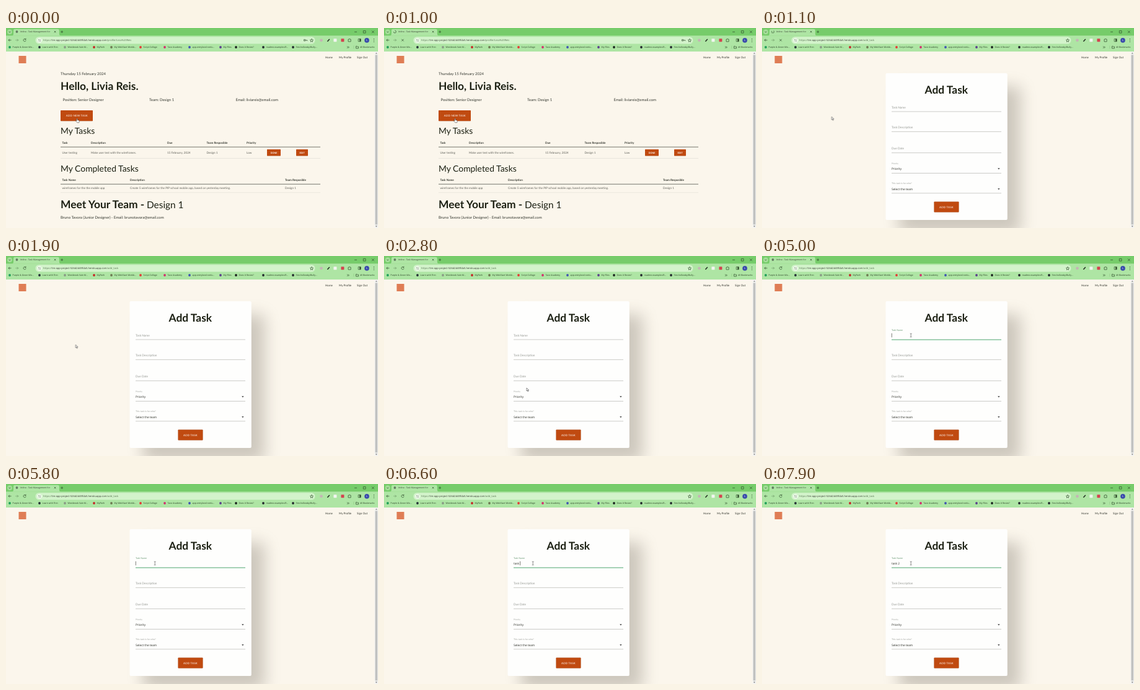
An HTML page for the animation above (8000 ms loop, 600 px wide and 323 px high).

```html
<!DOCTYPE html>
<html lang="en">
<head>
<meta charset="utf-8">
<title>Task manager demo</title>
<style>
html, body { margin: 0; width: 100%; height: 100%; overflow: hidden; background: #fbf6ec; }
svg { display: block; width: 100vw; height: 100vh; text-rendering: geometricPrecision; }
text { font: 6px Lato, sans-serif; fill: #34372f; white-space: pre; }
.ui text, .input { font-family: "Open Sans", "Noto Sans", sans-serif; }
.tab { font-size: 3.5px; }
.url { font-size: 4.1px; }
.mark text { font-size: 3.5px; fill: #22351f; }
.dim { fill: #55704f; }
.icon { fill: none; stroke: #2d4a29; stroke-width: .7; }
.nav text { font-size: 4.5px; }
.h1 { font-size: 17.4px; font-weight: 700; fill: #1c2013; }
.h2 { font-size: 13.9px; fill: #1c2013; }
.cell { font-size: 4.65px; fill: #5c5d56; }
.head { font-size: 4.6px; font-weight: 700; }
.btn rect { fill: #c04a10; filter: drop-shadow(0 .5px .5px #0004); }
.btn text { font-size: 4.4px; letter-spacing: .2px; fill: #fff; text-anchor: middle; }
.btn .small { font-size: 3.7px; letter-spacing: 0; font-weight: 700; }
.field { font-size: 4.75px; fill: #92958f; }
.tiny { font-size: 3.7px; fill: #a2a49f; }
.input { font-size: 4.75px; fill: #25271f; }
.rule { stroke: #a9aaa5; stroke-width: .6; }

/* One shared 8 s clock */
.profile, .form, .busy, .idle, .spin, .still, .hand, .arrow, .beam {
  animation: 8s step-end infinite;
}
.profile, .hand { animation-name: untilNav; }
.form { animation-name: afterNav; }
.busy { animation-name: loading; }
.idle { animation-name: notLoading; }
.spin { animation-name: spinning; }
.still { animation-name: notSpinning; }
.arrow { animation-name: arrowOn; }
.beam { animation-name: beamOn; }
.pointer { animation: travel 8s infinite; }
.label { animation: floatUp 8s infinite; }
.focus { animation: underline 8s infinite; stroke: #48b574; stroke-width: .8; }
.ring { animation: turn 1s linear infinite; transform-origin: 17.5px 6px; }

@keyframes untilNav { 0% { visibility: visible } 13.7%, 100% { visibility: hidden } }
@keyframes afterNav { 0% { visibility: hidden } 13.7%, 100% { visibility: visible } }
@keyframes loading { 0% { visibility: hidden } 7.5% { visibility: visible } 23.7%, 100% { visibility: hidden } }
@keyframes notLoading { 0% { visibility: visible } 7.5% { visibility: hidden } 23.7%, 100% { visibility: visible } }
@keyframes spinning { 0% { visibility: hidden } 12.5% { visibility: visible } 23.7%, 100% { visibility: hidden } }
@keyframes notSpinning { 0% { visibility: visible } 12.5% { visibility: hidden } 23.7%, 100% { visibility: visible } }
@keyframes arrowOn { 0% { visibility: hidden } 13.7% { visibility: visible } 43.75%, 100% { visibility: hidden } }
@keyframes beamOn { 0% { visibility: hidden } 43.75%, 100% { visibility: visible } }
@keyframes travel {
  0%, 12.5% { transform: translate(114px, 146px); }
  13.7%, 25% { transform: translate(112.3px, 143.3px); animation-timing-function: ease-in-out; }
  34%, 36% { transform: translate(230px, 213px); animation-timing-function: ease-in-out; }
  46%, 52% { transform: translate(241px, 128px); }
  58%, 100% { transform: translate(240.2px, 128px); }
}
@keyframes floatUp {
  0%, 47.5% { transform: translate(209px, 129.6px); fill: #92958f; animation-timing-function: ease-out; }
  50%, 100% { transform: translate(209px, 120.6px) scale(.8); fill: #6b9a75; }
}
@keyframes underline { 0%, 47.5% { opacity: 0 } 50%, 100% { opacity: 1 } }
@keyframes turn { to { transform: rotate(360deg) } }
</style>
</head>
<body>
<svg viewBox="0 0 600 323" preserveAspectRatio="none">
  <defs>
    <filter id="soft" x="-30%" y="-30%" width="170%" height="170%"><feGaussianBlur stdDeviation="13"/></filter>
  </defs>
  <rect width="600" height="323" fill="#fbf6ec"/>

  <g class="profile">
    <text x="88" y="76">Thursday 15 February 2024</text>
    <text x="88" y="100.3" class="h1">Hello, Livia Reis.</text>
    <text x="91.5" y="118">Position: Senior Designer</text>
    <text x="231" y="118">Team: Design 1</text>
    <text x="370.5" y="118">Email: liviareis@email.com</text>
    <g class="btn">
      <rect x="88" y="133" width="52" height="17.2" rx=".8"/>
      <text x="114.4" y="143.3">ADD NEW TASK</text>
    </g>
    <text x="88" y="171.3" class="h2">My Tasks</text>
    <g id="tables"></g>
    <path d="M88 192.2H507M88 252.2H507" stroke="#3b3d35" stroke-width=".7"/>
    <path d="M88 210.5H507M88 265.8H507" stroke="#dedbd2" stroke-width=".6"/>
    <g class="btn">
      <rect x="421" y="196" width="22" height="10.4" rx=".6"/>
      <text x="432" y="202.6" class="small">DONE</text>
      <rect x="468" y="196" width="19" height="10.4" rx=".6"/>
      <text x="477.5" y="202.6" class="small">EDIT</text>
    </g>
    <text x="88" y="231.8" class="h2">My Completed Tasks</text>
    <text x="88" y="291.3" class="h1">Meet Your Team -</text>
    <text x="227" y="291.3" class="h2" style="font-size:15.4px">Design 1</text>
    <text x="88" y="308">Bruno Tavora (Junior Designer) - Email: brunotavora@email.com</text>
  </g>

  <g class="form">
    <rect x="221" y="95" width="196" height="237" fill="#6b6459" opacity=".32" filter="url(#soft)"/>
    <rect x="199.5" y="73" width="196.3" height="237" rx="2" fill="#fefefd"/>
    <text x="297.3" y="106.3" class="h1" text-anchor="middle">Add Task</text>
    <path class="rule" d="M209 135H386M209 167.4H386M209 201.6H386M209 234.5H386M209 266.8H386"/>
    <path class="focus" d="M209 135.3H386"/>
    <text class="field label">Task Name</text>
    <text x="209" y="162.3" class="field">Task Description</text>
    <text x="209" y="196.4" class="field">Due Date</text>
    <text x="209" y="219.5" class="tiny" style="font-size:3.4px">Priority</text>
    <text x="209" y="229" class="input">Priority</text>
    <text x="209" y="252.3" class="tiny">This task is for who?</text>
    <text x="209" y="261.7" class="input">Select the team</text>
    <path d="M380.2 226.5h3.4l-1.7 1.8zM380.2 259.2h3.4l-1.7 1.8z" fill="#151515"/>
    <text id="typed" x="209" y="129.8" class="input"></text>
    <path id="caret" d="M0 124.8V131.4" stroke="#22251d" stroke-width=".6"/>
    <g class="btn">
      <rect x="277.5" y="280.5" width="40" height="17" rx=".8"/>
      <text x="297.5" y="290.7">ADD TASK</text>
    </g>
  </g>

  <rect x="20.5" y="45" width="12" height="12" fill="#df7d55"/>
  <g class="nav">
    <text x="515" y="48.6">Home</text>
    <text x="537" y="48.6">My Profile</text>
    <text x="566" y="48.6">Sign Out</text>
  </g>

  <rect x="594.5" y="38" width="5.5" height="285" fill="#f3f3f1"/>
  <rect x="595.5" y="43.5" width="3.6" height="274" fill="#c0c1c0"/>
  <path d="M595.8 41.6h3l-1.5-1.9zM595.8 319.6h3l-1.5 1.9z" fill="#777"/>

  <g class="ui">
    <rect width="600" height="14" fill="#76cc6a"/>
    <rect y="12.3" width="600" height="25.7" fill="#aee5a4"/>
    <path d="M9 12.4q3 0 3-3V4.2q0-2.4 2.4-2.4H83.5q2.4 0 2.4 2.4V9.4q0 3 3 3z" fill="#aee5a4"/>
    <circle cx="6" cy="6.3" r="4" fill="#a3dd98"/>
    <path class="icon" d="M4.6 5.7l1.4 1.4 1.4-1.4M77.8 4.8l2.6 2.6m0-2.6l-2.6 2.6M88.2 6.2h4m-2-2v4M549.5 6.3h4M562.3 4.4h3.7v3.7h-3.7zM590 4.4l3.8 3.8m0-3.8l-3.8 3.8" style="display:none"/>
    <path class="icon" d="M4.6 5.7l1.4 1.4 1.4-1.4M77.8 4.8l2.6 2.6m0-2.6l-2.6 2.6M88.2 6.2h4m-2-2v4M562 6.3h4M576.3 4.4h3.7v3.7h-3.7zM590 4.4l3.8 3.8m0-3.8l-3.8 3.8"/>
    <circle class="still" cx="17.5" cy="6" r="1.9" fill="#637b60"/>
    <g class="spin"><path class="icon ring" d="M17.5 4a2 2 0 1 1-2 2"/></g>
    <text x="22.8" y="7.4" class="tab">Velino - Task Management for</text>

    <path class="icon" d="M14.5 19.6H10m2-2l-2 2 2 2" transform="translate(-6 0)"/>
    <path class="icon" d="M15.3 19.6h4.5m-2-2l2 2-2 2" opacity=".45"/>
    <path class="icon idle" d="M31.7 18.2a2.1 2.1 0 1 0 .5 1.6M32 16.8v1.7h-1.8"/>
    <path class="icon busy" d="M28.3 17.9l3.5 3.5m0-3.5l-3.5 3.5"/>
    <rect x="47.5" y="14.2" width="451" height="11.4" rx="5.7" fill="#d3f3cb"/>
    <circle cx="54" cy="19.9" r="3.7" fill="#f0faed"/>
    <path class="icon" d="M52.2 18.8h1.6m1 0h1M52.2 21h.7m1 0h1.9"/>
    <text x="60" y="21.4" class="url"><tspan class="dim">https://</tspan>tm-app-project-526d2d49fda5.herokuapp.com<tspan class="dim" id="path"></tspan></text>
    <g class="profile"><path class="icon" d="M480.5 18.7h2.3v2.2h-2.3zM482.8 19.8h3v1.2"/></g>
    <path class="icon" d="M493 17.4l.8 1.7 1.8.2-1.3 1.3.3 1.8-1.6-.9-1.6.9.3-1.8-1.3-1.3 1.8-.2z"/>
    <circle cx="508.5" cy="19.8" r="2.4" fill="#c4b5b4"/>
    <path d="M518.4 21.8l3.4-3.8" stroke="#222e20" stroke-width="1.5"/>
    <rect x="528.4" y="17.2" width="5" height="5" rx=".6" fill="#f2f5f0"/>
    <rect x="540.4" y="17.2" width="5" height="5" rx=".6" fill="#d4434f"/>
    <path class="icon" d="M552 18.2h1.3a.8.8 0 0 1 1.6 0h1.2v3.8H552zM568.2 17.6h4v4.2h-4z"/>
    <path d="M570.2 17.6h2v4.2h-2z" fill="#2d4a29"/>
    <circle cx="582" cy="19.9" r="3.8" fill="#3949ab"/>
    <text x="582" y="21.4" text-anchor="middle" style="font-size:4.2px;fill:#fff">L</text>
    <path d="M593.4 17.4v.1m0 2.3v.1m0 2.3v.1" stroke="#243d20" stroke-width="1" stroke-linecap="round"/>

    <g class="mark" id="marks"></g>
    <path class="icon" d="M550.2 29.6l1.4 1.5-1.4 1.5m1.8-3l1.4 1.5-1.4 1.5M564.5 29.4h1.5l.6.7h1.8v2.8h-3.9z"/>
    <path d="M561 28.5v5" stroke="#7fbd75" stroke-width=".5"/>
  </g>

  <g class="pointer">
    <path class="hand" d="M0 .4q.8-.7 1.2.2v2l2.5.6q.7.3.6 1.1l-.6 2.5H.9L-1.6 4.2q0-.9.9-.6l.7.6z" fill="#fff" stroke="#222" stroke-width=".5"/>
    <path class="arrow" d="M0 0v5l1.2-1.1.9 2 .8-.4-.8-1.9h1.6z" fill="#fff" stroke="#222" stroke-width=".5"/>
    <path class="beam" d="M-1.3-2.8h1l.3.3.3-.3h1M0-2.5v5M-1.3 2.8h1l.3-.3.3.3h1" fill="none" stroke="#222" stroke-width=".55"/>
  </g>
</svg>
<script>
const $ = id => document.getElementById(id);

// The window controls and bookmarks share one small element builder.
function add(parent, tag, attrs, content = "") {
  const node = document.createElementNS("http://www.w3.org/2000/svg", tag);
  for (const key in attrs) node.setAttribute(key, attrs[key]);
  node.textContent = content;
  parent.append(node);
}

function row(y, cls, cells) {
  for (const [x, content] of cells) add($("tables"), "text", { x, y, class: cls }, content);
}
row(187, "head", [[90.5, "Task"], [137, "Description"], [260, "Due"], [323.5, "Team Resposible"], [388, "Priority"]]);
row(202.6, "cell", [[90.5, "User testing"], [137, "Make user test with the wireframes."], [260, "15 February, 2024"], [323.5, "Design 1"], [388, "Low"]]);
row(247.4, "head", [[90.5, "Task Name"], [200, "Description"], [450, "Team Resposible"]]);
row(260, "cell", [[90.5, "wireframes for the the mobile app"], [200, "Create 5 wireframes for the PIP school mobile app, based on yesterday meeting."], [450, "Design 1"]]);

const marks = [
  [4, "#1f9d58", "Purple & Green Wo..."], [52, "#263238", "Learn with Finn"],
  [93, "#8a9a86", "Westbrook Vale M..."], [140, "#c62828", "MyPath"],
  [168, "#6f7a52", "My WebStart Workb..."], [215, "#e53935", "Script College"],
  [254, "#d32f6f", "Tavo Academy"], [294, "#4054b2", "app.entrylevel.net/u..."],
  [344, "#5b3f8c", "My Files"], [369, "#1d2420", "Does It Resize?"],
  [413, "#24292e", "readme-examples/R..."], [461, "#24292e", "finn-hollowby/Bully..."]
];
for (const [x, fill, name] of marks) {
  add($("marks"), "circle", { cx: x + 2, cy: 31, r: 1.9, fill });
  add($("marks"), "text", { x: x + 6.6, y: 32.3 }, name);
}
add($("marks"), "text", { x: 571, y: 32.3 }, "All Bookmarks");

const LOOP = 8000, NAV = 1096, FOCUS = 3800;
const phrase = "task\u00a02";
const keys = [5900, 6050, 6200, 6350, 6500, 7300];
let start;

function draw(now) {
  start ??= now;
  const t = (now - start) % LOOP;
  const count = keys.filter(key => key <= t).length;
  const lastEvent = count ? keys[count - 1] : FOCUS;
  const caretOn = t >= FOCUS && (t - lastEvent) % 1000 < 500;
  $("typed").textContent = phrase.slice(0, count);
  const x = 209.3 + (count ? $("typed").getComputedTextLength() : 0);
  $("caret").setAttribute("transform", `translate(${x} 0)`);
  $("caret").style.opacity = caretOn ? 1 : 0;
  $("path").textContent = t < NAV ? "/profile/Livia%20Reis" : "/add_task";
  requestAnimationFrame(draw);
}
requestAnimationFrame(draw);
</script>
</body>
</html>
```
